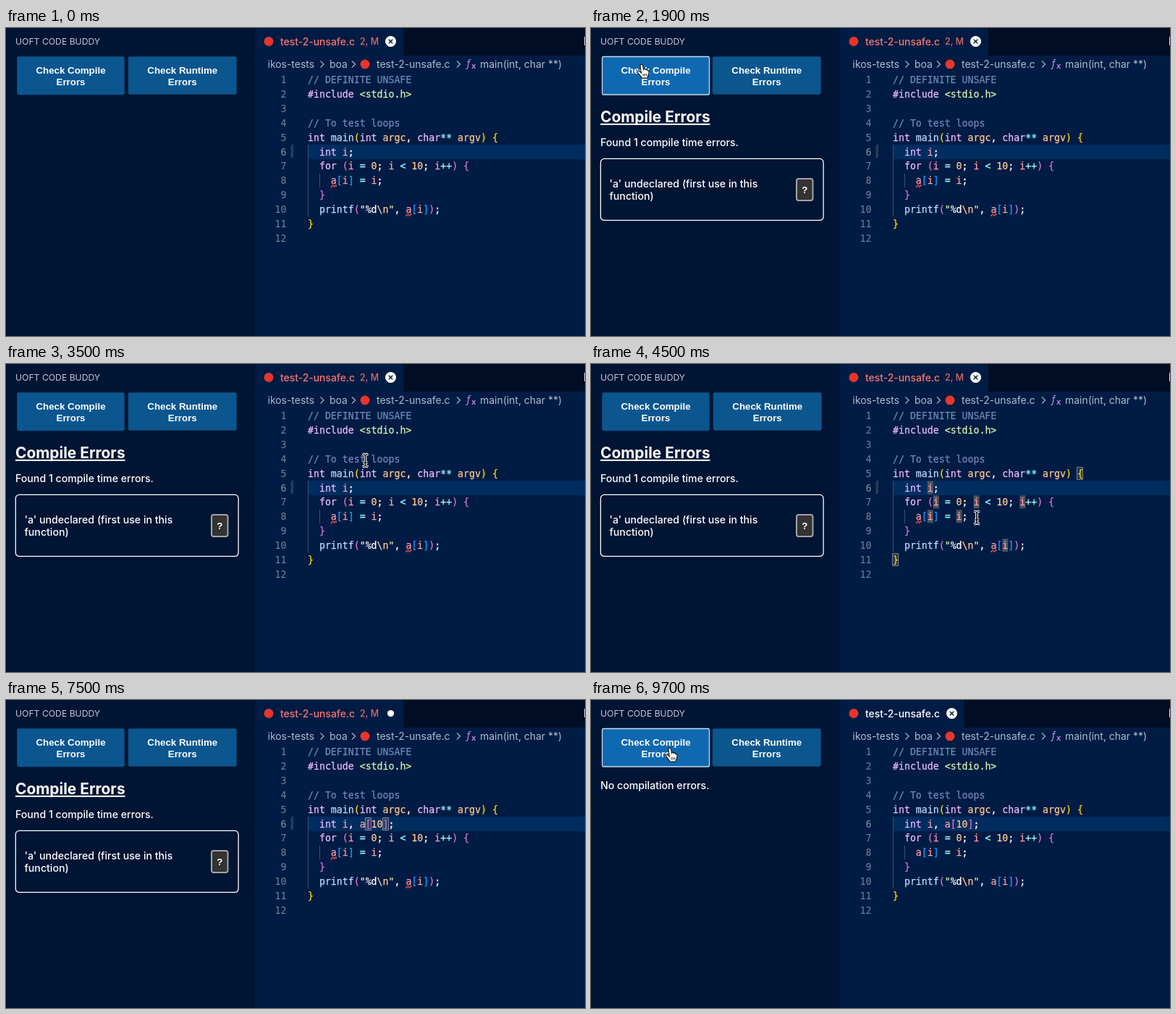
Animation of 800 by 425 pixels, one loop 9.8 s. Source, as an HTML page with a canvas:

```html
<!DOCTYPE html>
<html lang="en">
<head>
<meta charset="utf-8">
<title>Code checker</title>
<style>
html, body { margin: 0; overflow: hidden; background: #001433; }
canvas { display: block; }
</style>
</head>
<body>
<canvas id="stage" width="800" height="425"></canvas>
<script>
const ctx = document.getElementById('stage').getContext('2d');
const LOOP = 9800;
const CELL = 7.965, CODE_X = 417, ROW = 19.9;
const UI = 'Inter, sans-serif', ARIAL = '"Liberation Sans", sans-serif';
const BODY = '500 14.15px ' + UI, BOLD = 'bold 13.3px ' + ARIAL;
const MONO = '13.23px "DejaVu Sans Mono", monospace';
const BRACKETS = ['#ffd700', '#da70d6', '#179fff'];
const TOKEN = /\/\/.*|"|%d|\\n|#\w+|<\w+\.h>|[a-z]+|\d+|[=<+*]+|\s+|./g;

// Times of the events, in ms
const T = { hover: 1200, errors: 1500, leave: 2300, focus: 3900, comma: 5000, space: 5200,
  letter: 5500, accept: 6300, save: 8100, clean: 8500, rehover: 9050, passed: 9500 };

// Pointer stops: [time, x, y]
const VISITS = [
  [[500, 330, -12], [1200, 72, 60], [2150, 72, 60], [2700, 509, 94], [3200, 509, 94],
   [3800, 484, 172], [4000, 484, 172], [4400, 533, 212], [T.comma, 533, 212]],
  [[8500, 533, 212], [9150, 111, 76], [LOOP, 111, 76]]
];

function text(str, x, y, font, color, align = 'left') {
  ctx.font = font;
  ctx.fillStyle = color;
  ctx.textAlign = align;
  ctx.fillText(str, x, y);
}

// Code text is slightly emboldened
function codeText(str, x, y, color) {
  text(str, x, y, MONO, color);
  ctx.strokeStyle = color;
  ctx.lineWidth = .25;
  ctx.strokeText(str, x, y);
}

function rect(x, y, w, h, color) {
  ctx.fillStyle = color;
  ctx.fillRect(x, y, w, h);
}

function roundBox(x, y, w, h, r, fill, stroke, width = 1) {
  ctx.beginPath();
  ctx.roundRect(x, y, w, h, r);
  if (fill) { ctx.fillStyle = fill; ctx.fill(); }
  if (stroke) { ctx.strokeStyle = stroke; ctx.lineWidth = width; ctx.stroke(); }
}

function disc(x, y, r, color) {
  ctx.beginPath();
  ctx.arc(x, y, r, 0, 7);
  ctx.fillStyle = color;
  ctx.fill();
}

function line(points, color, width) {
  ctx.beginPath();
  points.forEach(([x, y]) => ctx.lineTo(x, y));
  ctx.strokeStyle = color;
  ctx.lineWidth = width;
  ctx.stroke();
}

function button(x, y, w, h, label, hot) {
  roundBox(x - .5, y - .5, w + 1, h + 1, 2, hot ? '#0f69b0' : '#0b568e', hot ? '#c4dcf2' : '#084273', hot ? 1.3 : 1);
  text(label, x + w / 2, y + 23, BOLD, '#fff', 'center');
  text('Errors', x + w / 2, y + 38.5, BOLD, '#fff', 'center');
}

function sidebar(t) {
  rect(0, 0, 344, 425, '#001433');
  text('UOFT CODE BUDDY', 13, 23, '12.2px ' + UI, '#c0c9d7');
  const hot = t >= T.hover && t < T.leave || t >= T.rehover;
  button(16, 40, 147, 51.5, 'Check Compile', hot);
  button(hot ? 168.5 : 169.5, 40, 148.5, 51, 'Check Runtime', false);
  if (t >= T.passed) {
    text('No compilation errors.', 13, 123, BODY, '#fff');
  } else if (t >= T.errors) {
    text('Compile Errors', 13, 130, 'bold 20.9px ' + UI, '#fff');
    rect(13, 131.8, 151.5, 2, '#fff');
    text('Found 1 compile time errors.', 13, 163, BODY, '#fff');
    roundBox(13.3, 180.4, 307.8, 85, 5, null, '#fff', 1.3);
    text("'a' undeclared (first use in this", 25.5, 220, BODY, '#fff');
    text('function)', 25.5, 236.5, BODY, '#fff');
    roundBox(284, 208, 22.5, 30, 3, '#333', '#a5a5a5', 2);
    text('?', 295.2, 227.5, BOLD, '#fff', 'center');
  }
}

function chevron(x) {
  line([[x, 45.5], [x + 4.5, 50], [x, 54.5]], '#a5b3c8', 1.2);
}

function header(t) {
  const clean = t >= T.clean, unsaved = t >= T.comma && t < T.save;
  const tabEnd = clean ? 515 : 549, markX = clean ? 498.5 : 531.5;
  rect(344, 0, 456, 425, '#001c44');
  rect(tabEnd, 0, 800 - tabEnd, 38, '#000d24');
  rect(799, 12, 1, 12, '#cfd6e2');
  disc(363, 18.5, 6.5, '#e8352c');
  text('test-2-unsafe.c', 379, 23.5, '500 13.9px ' + UI, clean ? '#fff' : '#f8756f');
  if (!clean) text('2, M', 489, 23, '500 12.4px ' + UI, '#dc6a64');
  if (unsaved) {
    disc(markX, 18.5, 4.6, '#fff');
  } else {
    disc(markX, 18.5, 7.5, '#fff');
    for (const s of [-1, 1]) line([[markX - 2.7, 18.5 - 2.7 * s], [markX + 2.7, 18.5 + 2.7 * s]], '#001c44', 1.5);
  }
  const crumb = (str, x) => text(str, x, 55, '13.95px ' + UI, '#adbacd');
  crumb('ikos-tests', 361.5);
  chevron(434.5);
  crumb('boa', 447);
  chevron(478);
  disc(496, 50, 6.5, '#e8352c');
  crumb('test-2-unsafe.c', 512);
  chevron(623);
  text('ƒ', 636, 54, 'italic 15px ' + UI, '#b180d7');
  text('x', 643, 56, 'bold 11px ' + UI, '#b180d7');
  crumb('main(int, char **)', 655);
}

function tokenColor(token) {
  if (token.startsWith('//')) return '#7285b7';
  if (/^(#\w+|int|char|for)$/.test(token)) return '#ebbbff';
  if (/^("|<\w)/.test(token)) return '#d1f1a9';
  if (/^(main|printf)$/.test(token)) return '#bbdaff';
  if (/^(\d+|arg[cv]|\\n)$/.test(token)) return '#ffc58f';
  if (/^[ai]$/.test(token)) return '#ff9da4';
  if (/^[=<+*]+$/.test(token)) return '#99ffff';
  return '#fff';
}

function declaration(t) {
  if (t < T.comma) return '  int i;';
  if (t < T.space) return '  int i,;';
  if (t < T.letter) return '  int i, ;';
  return t < T.accept ? '  int i, a\u00a0\u00a0\u00a0\u00a0;' : '  int i, a[10];';
}

const colX = col => CODE_X + col * CELL;
const rowY = row => 61 + (row - 1) * ROW;

function bracketBox(row, col) {
  const x = Math.round(colX(col)) - .5, y = Math.round(rowY(row)) + 1.5;
  roundBox(x, y, 8, 17, 0, 'rgba(120,130,120,.25)', '#7d8388');
}

function squiggle(row, col) {
  const points = [];
  for (let x = 0; x <= 8; x += .5) points.push([colX(col) + x, rowY(row) + 17.8 + 1.4 * Math.sin(x * 1.6)]);
  line(points, '#f0443e', 1.3);
}

function editor(t) {
  const lines = ['// DEFINITE UNSAFE', '#include <stdio.h>', '', '// To test loops',
    'int main(int argc, char** argv) {', declaration(t), '  for (i = 0; i < 10; i++) {',
    '    a[i] = i;', '  }', '  printf("%d\\n", a[i]);', '}', ''];
  const focused = t >= T.focus && t < T.rehover + 250;
  const marksI = t >= T.focus && t < T.comma;
  rect(418, 161, 382, 20, '#002d60');
  rect(417, 161, 1, 99, '#36506f');
  rect(433, 201, 1, 19, '#36506f');
  if (t < T.clean) {
    for (let y = 163; y < 181; y += 3) line([[393.5, y + 1], [397, y - 2]], '#6f8291', 1);
  }
  if (t >= T.focus && t < T.accept) {
    bracketBox(5, 32);
    bracketBox(11, 0);
  } else if (t >= T.accept && t < T.clean) {
    bracketBox(6, 10);
    bracketBox(6, 13);
  }

  let depth = 0;
  lines.forEach((code, n) => {
    const row = n + 1, base = rowY(row) + 15;
    text(row, 387.5, base, MONO, row === 6 ? '#8492a3' : '#71839a', 'right');
    for (const { 0: token, index } of code.matchAll(TOKEN)) {
      let color = tokenColor(token);
      if (/[([{]/.test(token)) color = BRACKETS[depth++ % 3];
      else if (/[)\]}]/.test(token)) color = BRACKETS[--depth % 3];
      if (token === 'i' && marksI) rect(colX(index), rowY(row) + 1, 8, 18, '#4b515c');
      codeText(token, colX(index), base, color);
    }
  });
  if (t >= T.letter && t < T.accept) text('[10]', colX(10), rowY(6) + 15, 'italic ' + MONO, '#62789a');
  if (t < T.clean) {
    squiggle(8, 4);
    squiggle(10, 17);
  }

  const typing = t >= T.comma && t < T.accept;
  const blink = Math.floor((t - T.focus) / 500) % 2 === 0;
  if (focused && (typing || blink)) {
    const col = t < T.comma ? 7 : t < T.space ? 8 : t < T.letter ? 9 : t < T.accept ? 10 : 14;
    rect(colX(col) - .7, 162, 2, 18, '#fff');
  }
}

function iBeam(x, y) {
  const shape = [[[x - 4, y - 9], [x - 1, y - 8], [x, y - 6], [x, y + 6], [x - 1, y + 8], [x - 4, y + 9]],
    [[x + 4, y - 9], [x + 1, y - 8], [x, y - 6], [x, y + 6], [x + 1, y + 8], [x + 4, y + 9]],
    [[x - 3, y + 3], [x + 3, y + 3]]];
  for (const [color, width] of [['#fff', 3.4], ['#111', 1.3]]) {
    shape.forEach(points => line(points, color, width));
  }
}

function hand(x, y) {
  const glove = new Path2D('M-4 -8C-4 -10.5 -1 -10.5 -.5 -8L.5 -3C1 -4.5 3 -4 3.2 -2.5C4 -3.6 5.6 -3 5.8 -1.5C7 -2 8 -1 8 .5C8 4 7 5 6 9L-2 9C-3 6 -6 4 -7.5 1C-8 -.7 -6 -1.5 -4.6 0L-2.6 2Z');
  ctx.save();
  ctx.translate(x, y);
  ctx.fillStyle = '#fff';
  ctx.strokeStyle = '#111';
  ctx.lineWidth = 1.1;
  ctx.fill(glove);
  ctx.stroke(glove);
  for (const dx of [0, 2.3, 4.6]) line([[dx, 3], [dx + .2, 6.5]], '#111', .9);
  ctx.restore();
}

function pointer(t) {
  const visit = VISITS.find(v => t >= v[0][0] && t < v.at(-1)[0]);
  if (!visit) return;
  const next = visit.findIndex(stop => stop[0] > t);
  const [t0, x0, y0] = visit[next - 1], [t1, x1, y1] = visit[next];
  const p = (t - t0) / (t1 - t0), ease = p * p * (3 - 2 * p);
  const x = x0 + (x1 - x0) * ease, y = y0 + (y1 - y0) * ease;
  (x < 344 ? hand : iBeam)(x, y);
}

function frame(now) {
  const t = Math.floor(now % LOOP / 100) * 100;
  header(t);
  editor(t);
  sidebar(t);
  pointer(t);
  requestAnimationFrame(frame);
}
requestAnimationFrame(frame);
</script>
</body>
</html>
```
